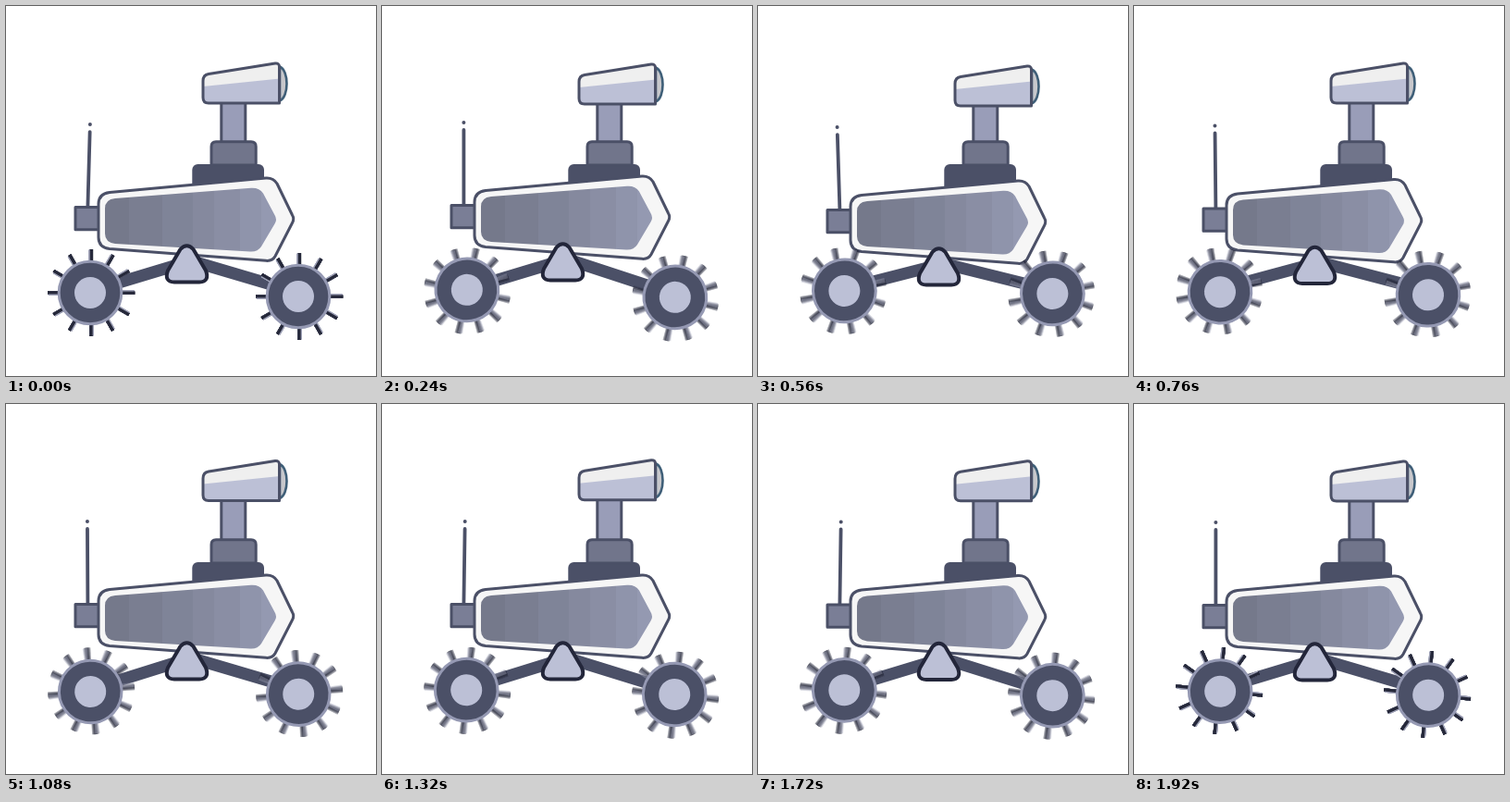
Recreate the animation shown at these times as an HTML page. Size 400 by 400 pixels, loop 1.96 s.

```html
<!DOCTYPE html>
<html lang="en">
<head>
<meta charset="utf-8">
<title>Rover</title>
<style>
  html, body { margin: 0; width: 100%; height: 100%; overflow: hidden; background: #fff; }
  svg { display: block; width: 100%; height: 100%; }
  .line { stroke: #4b5067; stroke-width: 3; stroke-linejoin: round; }
</style>
</head>
<body>
<svg viewBox="0 0 400 400">
  <defs>
    <linearGradient id="panel" gradientUnits="userSpaceOnUse" x1="107" y1="0" x2="292" y2="0"></linearGradient>
    <clipPath id="headShape">
      <path d="M219 73.5 L291 62 Q295.5 61.5 295.5 66 V105 H219 Q213 105 213 99 V81 Q213 74.5 219 73.5Z"/>
    </clipPath>
  </defs>

  <g id="head">
    <rect class="line" x="232.8" y="95" width="26" height="62" fill="#999db8"/>
    <path d="M296 65.5 C306 70 306 98 296 102.5Z" fill="#c8c8cc" stroke="#3f5f78" stroke-width="2.6"/>
    <g clip-path="url(#headShape)">
      <rect x="210" y="58" width="90" height="50" fill="#bcc0d6"/>
      <path d="M210 58 H300 V78.2 L210 87.4Z" fill="#efefef"/>
    </g>
    <path class="line" fill="none" d="M219 73.5 L291 62 Q295.5 61.5 295.5 66 V105 H219 Q213 105 213 99 V81 Q213 74.5 219 73.5Z"/>
  </g>

  <rect x="201.3" y="171" width="77.7" height="36" rx="6" fill="#4b5067"/>
  <path class="line" fill="#71758b" d="M222 172 V152 Q222 146.8 227 146.8 H265 Q270.2 146.8 270.2 152 V172Z"/>

  <path id="arms" fill="none" stroke="#4b5067" stroke-width="13"/>

  <g id="body">
    <g id="antenna" stroke="#4b5067" fill="#4b5067">
      <path d="M88.4 217 V136" stroke-width="3.8" stroke-linecap="round"/>
      <circle cx="88.4" cy="128" r="2" stroke="none"/>
    </g>
    <rect class="line" x="75" y="217.4" width="28" height="24.4" fill="#7a7e96"/>
    <path class="line" fill="#f6f6f6" d="M112 201.5 L281 186 Q289 185.5 293 192 L309.5 226 Q312 230 309.5 234.500 L291 270.500 Q288 276 281 275.300 L112 262.500 Q100 261 100 250 V214 Q100 203 112 201.500Z"/>
    <path fill="url(#panel)" d="M118 208 L265 196.800 Q274 196.300 278 202.500 L290.500 226 Q293.500 231 290.500 235.500 L276 260 Q272 266 264 265.500 L118 257 Q107 255.500 107 246 V219 Q107 209 118 208Z"/>
  </g>

  <g id="wheels"></g>

  <path id="pivot" fill="#bcc0d6" stroke="#23263a" stroke-width="4" stroke-linejoin="round"
    d="M188.500 263 Q195.500 255.500 202.500 263 L216 286 Q220.500 298 209 298.500 H182 Q170.500 298 175 286Z"/>
</svg>
<script>
const LOOP = 1960, STEP = 40, SPIN = 0.3;
const NS = 'http://www.w3.org/2000/svg';
const $ = id => document.getElementById(id);

function add(parent, tag, attrs = {}) {
  const el = document.createElementNS(NS, tag);
  for (const key in attrs) el.setAttribute(key, attrs[key]);
  return parent.appendChild(el);
}

// Shaded bands of the side panel
const edges = [107, 133, 169, 202, 225, 253, 276, 292];
for (let i = 0; i < edges.length - 1; i++) {
  const k = i / 6;
  const color = `rgb(${117 + 31 * k},${121 + 32 * k},${139 + 38 * k})`;
  for (const x of [edges[i], edges[i + 1]])
    add($('panel'), 'stop', { offset: (x - 107) / 185, 'stop-color': color });
}

// [time, offset] pairs
const tracks = {
  head: [[0, 0], [120, -2.4], [240, 1], [400, 2], [560, 3], [760, 0], [920, -2.4], [1080, -.5],
         [1280, -1.5], [1520, 2], [1760, -.4], [1920, 0]],
  body: [[0, 0], [240, -2], [560, 3], [760, 1.5], [1080, -1], [1520, -1], [1920, 0]],
  lean: [[0, 1.6], [240, 0], [560, -1.8], [760, -.6], [1080, -.3], [1520, 1.7], [1920, 0]],
  left: [[0, 0], [240, -2], [560, -1.8], [760, -1.7], [1080, .3], [1520, -.4], [1920, 0]],
  right: [[0, 0], [160, 2.8], [240, 2], [560, -2.8], [760, -2.6], [1080, -1], [1280, .8],
          [1520, -.8], [1760, 1.8], [1920, 0]]
};

function sample(track, t) {
  const i = track.findIndex(p => p[0] > t);
  if (i < 0) return track[track.length - 1][1];
  const [t0, a] = track[i - 1], [t1, b] = track[i];
  return a + (b - a) * (1 - Math.cos(Math.PI * (t - t0) / (t1 - t0))) / 2;
}

// The disc sits slightly off the axle, so it wobbles as it turns.
function makeWheel(x, y) {
  const root = add($('wheels'), 'g');
  const blades = [];
  for (let n = -2; n <= 2; n++) {
    const g = add(root, 'g');
    for (let a = 0; a < 360; a += 30) {
      const spoke = add(g, 'g', { transform: `rotate(${a})` });
      add(spoke, 'path', { d: 'M-.5 -33V-46.3', stroke: '#a0a3b8', 'stroke-width': 4.2 });
      add(spoke, 'path', { d: 'M.2 -33V-47', stroke: '#25283a', 'stroke-width': 3.3 });
    }
    blades.push(g);
  }
  const disc = add(root, 'g');
  add(disc, 'circle', { cx: -1.2, r: 33.8, fill: '#4b5067', stroke: '#9599b3', 'stroke-width': 3 });
  add(disc, 'circle', { cx: -1.2, r: 17, fill: '#bcc0d6' });

  return (dy, angle, blur) => {
    root.setAttribute('transform', `translate(${x} ${y + dy})`);
    disc.setAttribute('transform', `rotate(${angle})`);
    blades.forEach((g, i) => {
      g.setAttribute('transform', `rotate(${angle + (i - 2) * 1.3 * blur})`);
      g.setAttribute('opacity', blur ? .38 : 1);
    });
  };
}
const leftWheel = makeWheel(92.2, 310);
const rightWheel = makeWheel(317.2, 314);

const shift = (id, y) => $(id).setAttribute('transform', `translate(0 ${y})`);

function draw(now) {
  const t = Math.floor((now % LOOP) / STEP) * STEP;
  const at = {};
  for (const key in tracks) at[key] = sample(tracks[key], t);

  shift('head', at.head);
  shift('body', at.body);
  shift('pivot', at.body);
  $('antenna').setAttribute('transform', `rotate(${at.lean} 88.4 217)`);
  $('arms').setAttribute('d',
    `M92 ${308 + at.left}L195 ${277 + at.body}M195 ${274 + at.body}L317 ${310 + at.right}`);

  const blur = t > 0 && t < 1920 ? 1 : 0;
  leftWheel(at.left, t * SPIN, blur);
  rightWheel(at.right, t * SPIN, blur);
}

const start = performance.now();
function tick() {
  draw(performance.now() - start);
  requestAnimationFrame(tick);
}
tick();
</script>
</body>
</html>
```
